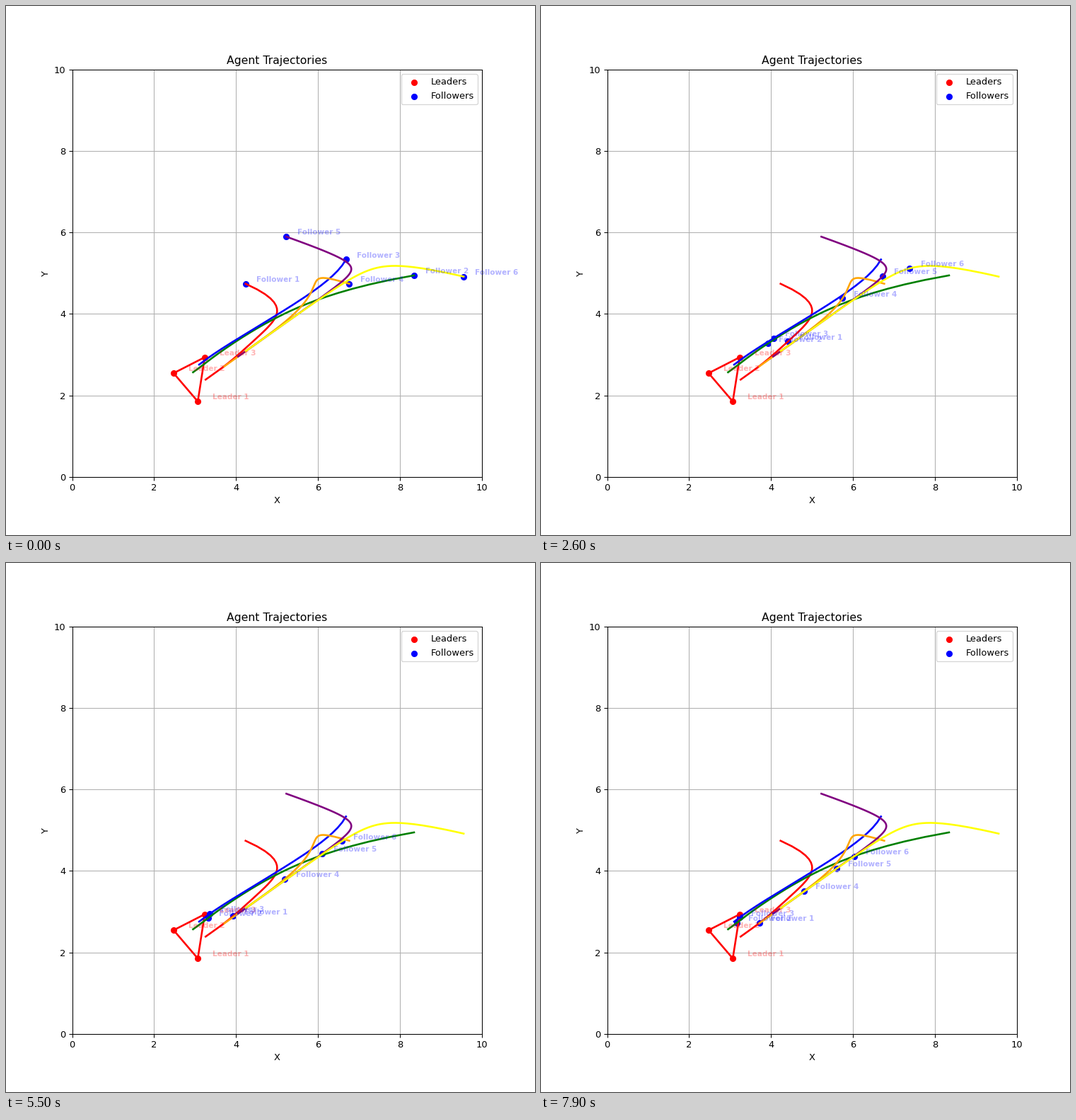
These frames come from a looping animation (748 by 748 pixels, 8 s). A matplotlib script:

```python
import numpy as np
import matplotlib.pyplot as plt
from matplotlib.animation import FuncAnimation

INCHES, DPI = 8, 93.5
FRAMES, INTERVAL = 80, 100
STEPS, GAIN = 200, 0.051

LEADERS = np.array([(3.065, 1.85), (2.475, 2.545), (3.235, 2.935)])
STARTS = np.array([(4.23, 4.74), (8.34, 4.945), (6.68, 5.335),
                   (6.76, 4.74), (5.225, 5.895), (9.55, 4.915)])
COLORS = ["red", "green", "blue", "orange", "purple", "yellow"]

# Follower pairs that watch each other; followers 1-3 also watch one leader each
LINKS = [(1, 2), (2, 3), (1, 4), (4, 5), (5, 6)]


def simulate():
    """Consensus motion: each follower is drawn to the agents it watches."""
    n, m = len(STARTS), len(LEADERS)
    watch = np.zeros((n, n + m))
    for a, b in LINKS:
        watch[a - 1, b - 1] = watch[b - 1, a - 1] = 1
    watch[range(m), range(n, n + m)] = 1
    degree = watch.sum(axis=1, keepdims=True)

    pos = STARTS
    states = [pos]
    for _ in range(STEPS - 1):
        pull = watch @ np.vstack([pos, LEADERS]) - degree * pos
        pos = pos + GAIN * pull
        states.append(pos)
    return np.array(states)


def label_spot(x, y):
    return x + 0.8, y + 0.1


def add_labels(points, prefix, color):
    return [ax.text(*label_spot(*p), f"{prefix} {i}", color=color, alpha=0.3,
                    fontsize=8, fontweight="bold", ha="center", va="center")
            for i, p in enumerate(points, 1)]


states = simulate()

fig, ax = plt.subplots(figsize=(INCHES, INCHES), dpi=DPI)
ax.set(xlim=(0, 10), ylim=(0, 10), xlabel="X", ylabel="Y",
       title="Agent Trajectories")
ax.grid(True)

ax.scatter(*LEADERS.T, color="red", label="Leaders")
dots = ax.scatter(*STARTS.T, color="blue", label="Followers")
ax.plot(*np.vstack([LEADERS, LEADERS[:1]]).T, color="red", lw=2)
for path, color in zip(states.swapaxes(0, 1), COLORS):
    ax.plot(*path.T, color=color, lw=2)

add_labels(LEADERS, "Leader", "red")
names = add_labels(STARTS, "Follower", "blue")
ax.legend(loc="upper right")


def update(frame):
    dots.set_offsets(states[frame])
    for name, spot in zip(names, states[frame]):
        name.set_position(label_spot(*spot))
    return [dots, *names]


anim = FuncAnimation(fig, update, frames=FRAMES, interval=INTERVAL,
                     repeat=True, repeat_delay=0)
plt.show()
```
